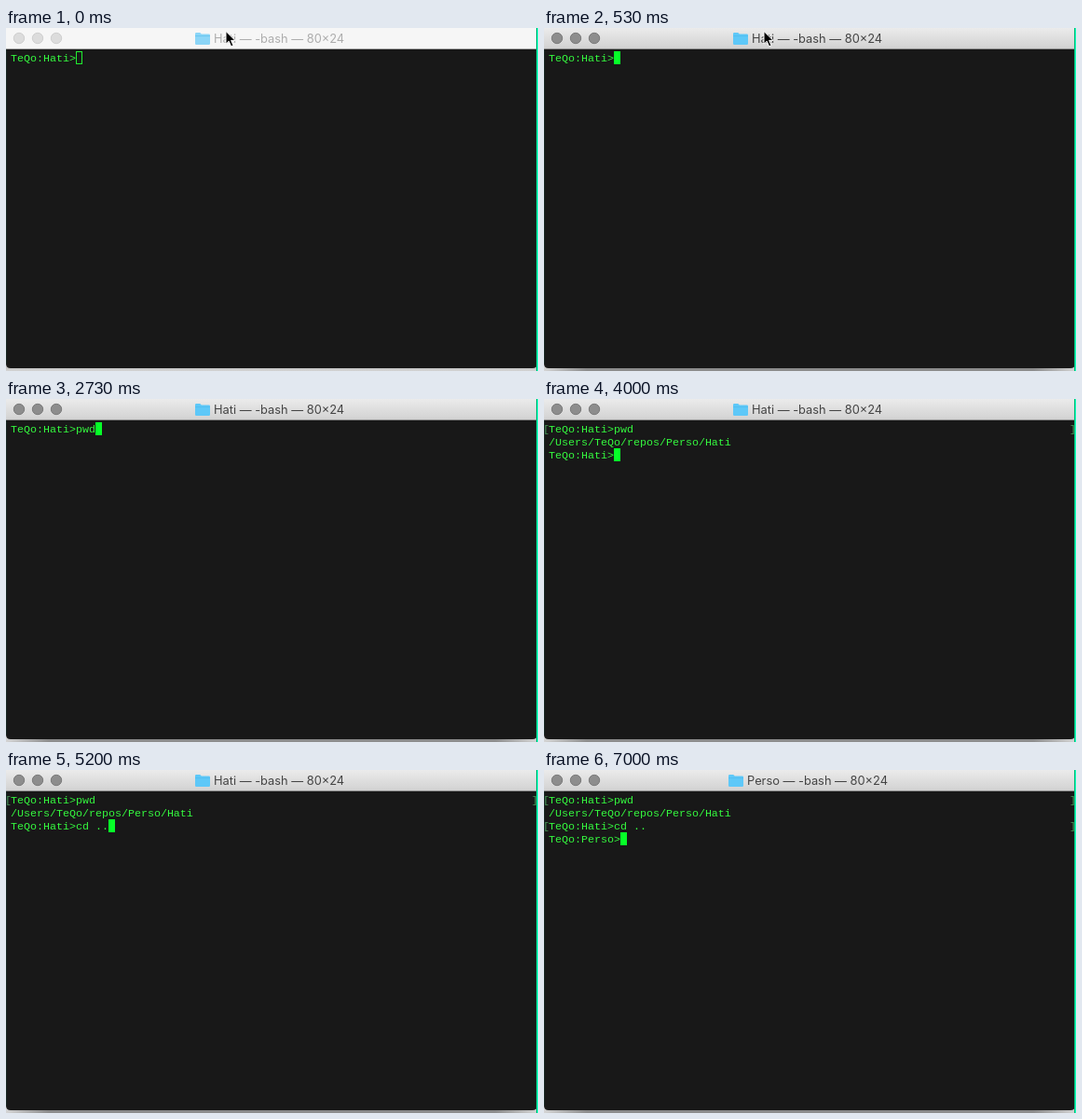
An HTML page for the animation above (8 s loop, 571 px wide and 369 px high).

```html
<!DOCTYPE html>
<html lang="en">
<head>
<meta charset="utf-8">
<title>Terminal session</title>
<style>
  html, body { margin: 0; width: 100%; height: 100%; overflow: hidden; background: #ccc; }
  svg { display: block; width: 571px; height: 369px; }
  text { white-space: pre; }
  .mono { font: 11.665px "Liberation Mono", monospace; fill: #35fa3f; }
  .mark { fill: #4a9a5c; }
  .title { font: 12.85px Inter, sans-serif; }
</style>
</head>
<body>
<svg viewBox="0 0 571 369">
  <defs>
    <linearGradient id="barActive" x2="0" y2="1">
      <stop stop-color="#ebebeb"/><stop offset="1" stop-color="#d2d2d2"/>
    </linearGradient>
    <linearGradient id="shadeActive">
      <stop stop-color="#d4d4d4"/><stop offset=".08" stop-color="#8c8c8c"/>
      <stop offset=".92" stop-color="#8c8c8c"/><stop offset="1" stop-color="#d4d4d4"/>
    </linearGradient>
    <linearGradient id="shadeIdle" x2="0" y2="1">
      <stop stop-color="#a8a8a8"/><stop offset="1" stop-color="#d4d4d4"/>
    </linearGradient>
  </defs>
  <rect id="shade" y="360" width="571" height="9"/>
  <path d="M0 22H570V361Q570 366 565 366H5Q0 366 0 361Z" fill="#181818"/>
  <path d="M.5 23V361" stroke="#162622"/>
  <rect id="bar" width="570" height="22"/>
  <rect id="edge" y="22" width="570" height="1"/>
  <rect x="569" width="1" height="369" fill="#0cb678"/>
  <rect x="570" width="1" height="369" fill="#06ffb8"/>
  <g id="lights">
    <circle cx="14" cy="11" r="5.7"/><circle cx="34" cy="11" r="5.7"/><circle cx="54" cy="11" r="5.7"/>
  </g>
  <g id="heading">
    <path id="folder" d="M0 6.2Q0 5 1.2 5H5.2L6.8 6.6H14.8Q16 6.6 16 7.8V16.8Q16 18 14.8 18H1.2Q0 18 0 16.8Z" fill="#5ec8f8"/>
    <path d="M0 8.6H16" stroke="#46b4e8" stroke-width=".8" opacity=".6"/>
    <text id="title" class="title" x="20" y="16"></text>
  </g>
  <g id="screen"></g>
  <rect id="cursor"/>
  <path id="pointer" d="M236 3.5V17.2L239.2 14.2L241.6 19.8L244 18.8L241.6 13.4H246Z" fill="#000" stroke="#fff" stroke-width="1"/>
</svg>
<script>
const LOOP = 8000, CELL = 7, ROW = 14, LEFT = 5;
const PROMPT = 'TeQo:Hati>';
const PWD = ['pwd', '/Users/TeQo/repos/Perso/Hati'];
const $ = id => document.getElementById(id);

// Typed text of the current command line, by time
const typing = [
  [0, ''], [2270, 'p'], [2600, 'pw'], [2730, 'pwd'],
  [3000, ''], [4270, 'c'], [4400, 'cd'], [4530, 'cd '],
  [5130, 'cd .'], [5200, 'cd ..'], [5400, 'cd ../'], [6600, 'cd ..'], [6930, '']
];
const cursorOff = [[1070, 1530], [2070, 2270], [4070, 4270], [5070, 5130], [6070, 6530]];
const FOCUS = 470, HIDE_POINTER = 2270, RUN_PWD = 3000, RUN_CD = 6930, RETITLE = 7000;

function linesAt(t) {
  const typed = typing.filter(step => step[0] <= t).pop()[1];
  const lines = [];
  if (t >= RUN_PWD) lines.push({ text: PROMPT + PWD[0], marked: true }, { text: PWD[1] });
  if (t >= RUN_CD) lines.push({ text: PROMPT + 'cd ..', marked: true });
  lines.push({ text: (t >= RUN_CD ? 'TeQo:Perso>' : PROMPT) + typed });
  return lines;
}

function set(id, attrs) {
  for (const name in attrs) $(id).setAttribute(name, attrs[name]);
}

const cellText = (text, x, row, extra = '') =>
  `<text class="mono ${extra}" x="${x}" y="${36 + row * ROW}">${text.replace('>', '&gt;')}</text>`;

function drawWindow(t) {
  const active = t >= FOCUS, moved = t >= RETITLE;
  set('bar', { fill: active ? 'url(#barActive)' : '#f6f6f6' });
  set('edge', { fill: active ? '#8e8e8e' : '#a8a8a8' });
  set('shade', { fill: active ? 'url(#shadeActive)' : 'url(#shadeIdle)' });
  set('lights', { fill: active ? '#8d8d8d' : '#dcdcdc', stroke: active ? '#7b7b7b' : '#cfcfcf' });
  set('title', { fill: active ? '#444' : '#adadad' });
  set('folder', { opacity: active ? 1 : 0.7 });
  set('heading', { transform: `translate(${moved ? 198 : 203} 0)` });
  $('title').textContent = (moved ? 'Perso' : 'Hati') + ' — -bash — 80×24';
  set('pointer', { visibility: t < HIDE_POINTER ? 'visible' : 'hidden' });
}

function drawScreen(t) {
  const lines = linesAt(t);
  $('screen').innerHTML = lines.map(({ text, marked }, row) =>
    cellText(text, LEFT, row) +
    (marked ? cellText('[', LEFT - CELL + 1, row, 'mark') + cellText(']', LEFT + 80 * CELL - 1, row, 'mark') : '')
  ).join('');

  const row = lines.length - 1;
  const x = LEFT + lines[row].text.length * CELL, y = 25 + row * ROW;
  const hidden = cursorOff.some(([from, to]) => t >= from && t < to);
  const box = t < FOCUS
    ? { x: x + 0.5, y: y + 0.5, width: 6, height: 13, fill: 'none', stroke: '#20f030' }
    : { x, y, width: 7, height: 14, fill: '#06ff28', stroke: 'none' };
  set('cursor', { ...box, visibility: hidden ? 'hidden' : 'visible' });
}

const start = performance.now();
function render(now) {
  const t = Math.max(0, now - start) % LOOP;
  drawWindow(t);
  drawScreen(t);
  requestAnimationFrame(render);
}
render(start);
</script>
</body>
</html>
```
